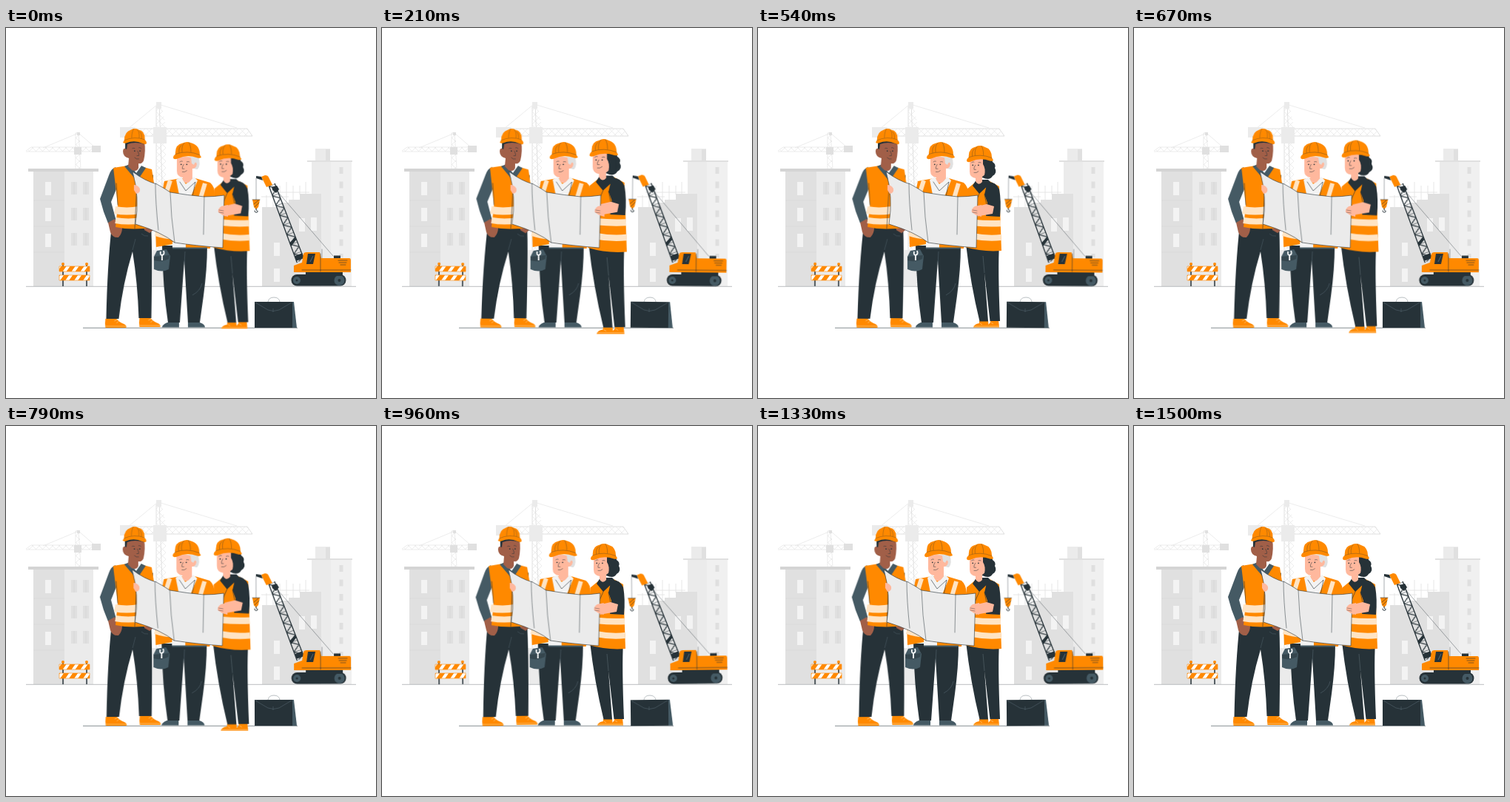
An HTML page without scripts that plays this animation: 500x500 px, repeating every 1.54 s.

```html
<!DOCTYPE html>
<html lang="en">
<head>
<meta charset="utf-8">
<title>Construction team</title>
<style>
html, body { margin: 0; width: 100%; height: 100%; overflow: hidden; background: #fff; }
svg { display: block; width: 100%; height: 100%; }

.orange { fill: #ff8900; }
.dark { fill: #263238; }
.slate { fill: #455a64; }
.brown { fill: #a15f48; }
.skin { fill: #ffb89d; }
.cream { fill: none; stroke: #ffe4c4; }
.ink { fill: none; stroke: #263238; stroke-linecap: round; stroke-linejoin: round; }
.shade { fill: #e0e0e0; }
.light { fill: #ebebeb; }
.pale { fill: #f3f3f3; }
.wire { fill: none; stroke: #e0e0e0; }

/* Each loop moves for 1.5s and then holds for 40ms. */
.sway, .beat, .shake { animation: 1.54s -.02s linear infinite; }
.sway, .beat { transform-box: fill-box; transform-origin: center; }
.sway { animation-name: sway; }
.beat { animation-name: beat; }
.shake { animation-name: shake; }

@keyframes sway {
  0%, 97.4%, 100% { transform: rotate(0deg); }
  24.4% { transform: rotate(1deg); }
  73.1% { transform: rotate(-1deg); }
}
@keyframes beat {
  0%, 29.2%, 39%, 58.4%, 100% { transform: scale(1); }
  9.7%, 48.7% { transform: scale(1.1); }
}
@keyframes shake {
  0%, 97.4%, 100% { transform: translateX(0); }
  9.7%, 87.7% { transform: translateX(-1px); }
  19.5%, 77.9% { transform: translateX(2px); }
  29.2%, 48.7%, 68.2% { transform: translateX(-4px); }
  39%, 58.4% { transform: translateX(4px); }
}
</style>
</head>
<body>
<svg viewBox="0 0 500 500" stroke-width=".6">
  <defs>
    <pattern id="truss" width="9" height="9" patternUnits="userSpaceOnUse">
      <path class="wire" d="M0 0L9 9M9 0L0 9"/>
    </pattern>
    <pattern id="lattice" width="10" height="14" x="-5" patternUnits="userSpaceOnUse">
      <path class="ink" stroke-width="1.2" d="M0 0L10 7L0 14M0 0H10"/>
    </pattern>
    <pattern id="hazard" width="12" height="8" patternUnits="userSpaceOnUse" patternTransform="skewX(-35)">
      <path fill="#fff" d="M0 0h12v8H0z"/>
      <path class="orange" d="M0 0h7v8H0z"/>
    </pattern>
    <g id="helmet">
      <path class="orange" d="M-16 16Q-17 3-6 1Q0-2 6 1Q17 4 17 17L19 20Q18 22 14 21Q0 16-13 22Q-18 24-19 21Q-19 18-16 16Z"/>
      <path class="ink" stroke-opacity=".55" d="M-16 16Q0 10 17 17M-7 13Q-8 4-4 1M5 13Q5 4 2 0M-11 14Q-12 7-8 4"/>
    </g>
    <g id="face">
      <path class="ink" d="M-7-6q2-2 4-1M4-6q3-1 4 0M-1-2Q-4 3-3 5H0M-3 10Q1 11 4 8"/>
      <circle class="dark" cx="-5" cy="-2" r="1"/>
      <circle class="dark" cx="4" cy="-2" r="1"/>
    </g>
    <g id="shoe">
      <path class="orange" d="M0 0H15Q19 5 25 7Q29 9 28 12H0Q-1 6 0 0Z"/>
      <path d="M0 10H28M12 3l4-2M15 6l3-3" fill="none" stroke="#ffd39b"/>
    </g>
    <path id="pane" class="pale" d="M0 0h8v18H0z"/>
    <g id="panes" class="shade">
      <path d="M0 0h8v17H0zM16 0h8v17h-8z"/>
      <path d="M4 0v17M20 0v17" stroke="#d6d6d6"/>
    </g>
  </defs>

  <!-- Tower cranes -->
  <g>
    <path class="wire" d="M98 142L50 162M98 142L120 161M94 190V142L98 141L101 190M27 166L34 161H127M27 167H127"/>
    <path fill="url(#truss)" d="M34 161H117V167H28zM94 145h6v45h-6z"/>
    <path class="shade" d="M116 159h12v9h-12zM92 161h10v10H92zM96 141h4v4h-4z"/>
    <path class="wire" d="M206 103L312 135M205 103L165 136"/>
    <path class="wire" stroke-width="1" d="M203 349V106L207 100L216 349M155 146H333L326 136H155"/>
    <path fill="url(#truss)" d="M165 136H326L333 146H165zM203 108h8l5 25V349H203z"/>
    <path class="light" d="M154 134h21v14h-21zM199 134h18v22h-18zM203 100h7v9h-7z"/>
    <path class="light" d="M195 300h19v49h-19z"/>
  </g>

  <!-- Buildings -->
  <g>
    <path class="shade" d="M37 194h42v155H37z"/>
    <path class="light" d="M79 194h39v155H79z"/>
    <path fill="#d4d4d4" d="M30 190h95v4H30z"/>
    <path d="M37 233H79M37 268H79M37 303H79" stroke="#d6d6d6"/>
    <use href="#pane" x="53" y="208"/><use href="#pane" x="53" y="243"/><use href="#pane" x="53" y="278"/>
    <use href="#panes" x="88" y="208"/><use href="#panes" x="88" y="243"/><use href="#panes" x="88" y="277"/>

    <path class="light" d="M413 181h26v168H413zM418 163h20v17h-20z"/>
    <path fill="#f0f0f0" d="M439 181h28v168H439z"/>
    <path class="shade" d="M407 179h61v2H407zM432 164h6v15h-6z"/>
    <path d="M453 188V310" stroke="#dfdfdf" stroke-width="5" stroke-dasharray="9 10.5"/>
    <path class="shade" d="M346 349V242H372V236H382V232H397V224H426V349Z"/>
    <path class="wire" stroke-width=".8" d="M352 242V226M361 242V213M370 240V213M379 235V208M388 232V213M397 225V213M405 224V208M345 228H382M356 222H410"/>
    <use href="#pane" x="362" y="290"/><use href="#pane" x="362" y="325"/>
    <use href="#pane" x="396" y="257"/><use href="#pane" x="412" y="256"/>
  </g>

  <path d="M27 349.3H473" stroke="#8b9194"/>
  <path d="M104 405.3H394" stroke="#697276" stroke-width=".8"/>

  <!-- Barrier -->
  <g class="sway">
    <path d="M77 320V349M109 320V349" stroke="#263238" stroke-width="1.5"/>
    <path fill="url(#hazard)" stroke="#ff8900" d="M72 322h41v7H72zM72 334h41v7H72z"/>
    <circle class="orange" cx="77" cy="319" r="2"/><circle class="orange" cx="109" cy="319" r="2"/>
  </g>

  <!-- Crawler crane -->
  <g class="sway">
    <path class="ink" stroke-width=".4" d="M365 219L442 308M338 203V232M427 299V312"/>
    <g transform="translate(359 212) rotate(-20.7)">
      <path fill="url(#lattice)" d="M-4.500 0H5V110H-5z"/>
      <path class="ink" stroke-width="1.3" d="M-4 0L-5 110M4.500 0L5.500 110"/>
      <path class="dark" d="M-5 82L5 77V81L-5 87zM-5 101H6V108H-5z"/>
    </g>
    <path class="orange" d="M345 201L350 199Q354 199 355 202L360 212L352 215Z"/>
    <path class="dark" d="M338 200L345 201L347 206L338 203ZM359 215L366 213L369 218L365 223L360 219Z"/>
    <path class="orange" d="M333 232H343L341 242L338 245L335 242Z"/>
    <path class="ink" d="M333 232H343M335 238L341 233M336 242L342 236"/>
    <path class="ink" stroke-width="1" d="M338 244V246Q342 248 339 249Q336 250 336 247"/>
    <rect class="dark" x="385.5" y="333" width="74" height="15.5" rx="7.7"/>
    <circle class="slate" cx="393" cy="341" r="5"/><circle class="slate" cx="450.5" cy="341" r="7"/>
    <circle class="dark" cx="393" cy="341" r="1.5"/><circle class="dark" cx="450.5" cy="341" r="2"/>
    <path class="dark" d="M405 329H455V335H405zM443 307.5h9v4h-9z"/>
    <path class="orange" d="M389 321L400 317L402 305Q403 303 406 303H424L426 311H464Q466 311 466 314V330H389Z"/>
    <path class="dark" d="M408 305H418L415 319H406Z"/>
    <path d="M411 316L415 308" stroke="#78909c"/>
    <path class="ink" d="M425 305V329M400 327H466M449 314H461M450 317H460M452 320H459"/>
  </g>

  <!-- Briefcase -->
  <g class="sway">
    <path d="M354 370Q355 364 362 364Q369 364 370 370" fill="none" stroke="#b7bdc0" stroke-width="1"/>
    <path class="slate" d="M386 370H389L393 405H386Z"/>
    <path class="dark" d="M336 370H387V405H336Z"/>
    <path d="M337 371L354 381Q361 384 369 381L386 371M361 379V384" fill="none" stroke="#52646d"/>
  </g>

  <!-- Left worker -->
  <g class="sway">
    <use href="#shoe" x="134.5" y="393"/><use href="#shoe" x="180.5" y="392"/>
    <path class="dark" d="M143 266H196Q198 300 196.500 392H179.500Q178 345 171 302Q158 345 152.500 393H135.500Q137 320 143 266Z"/>
    <path d="M171 300L175 285M183 278q4 4 9 3" stroke="#4b5b63" fill="none"/>
    <path class="slate" d="M148 188Q142 190 139 199L127 231Q131 248 138 264L148.500 259L142 235L151 213ZM190 190L199 199V215H188Z"/>
    <path class="brown" d="M138 263L147 258Q150 265 157 270Q157 278 152 283Q144 284 141 276ZM186 268L197 266L200 272L194 277L187 273Z"/>
    <path class="orange" d="M145 189L164 186L178 200L186 188L197 191L200 210V269Q172 274 148 269L151 239Z"/>
    <path class="slate" d="M160 187L167 184L176 196L183 186L189 189L177 207Z"/>
    <path class="cream" stroke-width="10" d="M147 246Q163 249 180 246"/>
    <path class="cream" stroke-width="8" d="M148 260Q164 263 185 260"/>
    <path class="ink" d="M177 208L174 271M151 239L149 210"/>
    <path class="brown" d="M162 154H187Q189 166 186 179Q184 184 179 183V189Q177 195 170 192L165 187L166 176Q158 174 158 167Q158 162 162 163Z"/>
    <path class="dark" d="M161 154Q175 149 188 155L187 157Q174 153 164 157L163 164L161 163Z"/>
    <use href="#face" transform="translate(177 168) scale(-.8 .9)"/>
    <use href="#helmet" transform="translate(174 136.5) scale(-.84 .9)"/>
  </g>

  <!-- Right worker -->
  <g class="beat">
    <path class="orange" d="M299 396H311L312 404.5H291Q292 400 299 399ZM314 395H325L326 404.5H311Q311 400 314 398Z"/>
    <path d="M291 403H326M300 399l3 2M315 398l3 2" stroke="#ffd39b"/>
    <path class="dark" d="M281 292H326Q324 325 327 396H313.500L306 331L311 396.500H299.500Q287 345 281 292Z"/>
    <path d="M304 308L306 331" stroke="#5a6970"/>
    <path class="orange" d="M282 218L293 209L313 207L326 214L329 301Q304 303 280 296Z"/>
    <path class="dark" d="M290 213L295 205H311L315 209L299 224ZM310 208Q321 207 326 218Q329 234 327 255L308 254L310 236L306 225Z"/>
    <path class="cream" stroke-width="8.5" d="M291 263Q310 265 328 264"/>
    <path class="cream" stroke-width="8" d="M289 281Q310 285 328.5 283"/>
    <path class="ink" d="M299 224L292 240M306 225L309 239"/>
    <path class="skin" d="M296 241L309 238L319 241L317 251L294 255Z"/>
    <path class="dark" d="M290 176H316L317 181Q322 184 320 189Q324 196 317 200Q313 207 303 202Z"/>
    <path class="skin" d="M286 177Q297 172 307 178V198L303 201V208Q298 214 294 207V203Q286 202 286 194Z"/>
    <path class="dark" d="M304 177H315V199H306Q308 190 304 184Z"/>
    <use href="#face" transform="translate(294.5 187) scale(.85)"/>
    <use href="#helmet" transform="translate(300 159.5) scale(.95)"/>
  </g>

  <!-- Middle worker and plan -->
  <g class="shake">
    <path class="slate" d="M218 398H234V404.5H211Q211 401 218 398ZM246 398H262Q269 400 269 404.5H246Z"/>
    <path class="dark" d="M211 294H272Q272 325 267 362L262 398H246L241 314L235 398H219Q212 350 211 294Z"/>
    <path d="M242 302L241 320M265 345Q263 355 252 361" stroke="#52646d" fill="none"/>
    <path class="orange" d="M214 207L236 203H256L276 209Q282 214 283 226L276 298H242L226 292L203 296L202 268Z"/>
    <path class="pale" d="M225 289L243 292V297H225Z"/>
    <path d="M225 297.5H272" stroke="#455a64" stroke-width="2"/>
    <path class="cream" stroke-width="8" d="M202 277Q214 281 228 282"/>
    <path class="cream" stroke-width="6" d="M222 206L217 222M269 210L263 230"/>
    <path class="pale" d="M230 205L237 201L243 211L254 201L259 206L249 230H235Z"/>
    <path class="ink" d="M235 208L243 220L256 208L252 228"/>
    <path class="shade" d="M231 174H260Q264 185 259 191Q254 191 250 187Z"/>
    <path class="skin" d="M231 176Q242 172 252 176L253 182Q257 179 258 184Q257 190 252 190V203Q244 215 239 205V202Q231 201 231 193Z"/>
    <path class="shade" d="M250 175H261L260 181Q256 180 254 185L251 183Z"/>
    <use href="#face" transform="translate(241 186) scale(.85)"/>
    <use href="#helmet" transform="translate(245 154.5)"/>

    <path class="slate" d="M204 301L217 299L222 308L220 326Q211 331 200 326V309Z"/>
    <path class="dark" d="M200 309L221 307L220 312Q211 317 200 314Z" opacity=".5"/>
    <path d="M211 314V307M209 302Q208 307 211 307Q215 306 213 301" fill="none" stroke="#fff" stroke-width="1.8"/>

    <path d="M171 194Q188 207 204 211Q213 216 222 222Q246 226 268 228Q282 228 295 226L293 297Q255 294 228 290Q211 276 175 265Q181 228 171 194Z" fill="#ebebeb" stroke="#263238"/>
    <path class="ink" stroke-width=".5" d="M202 210Q202 235 206 273M222 222Q223 255 228 290M268 228L267 279"/>
    <path class="skin" d="M173 212Q178 212 181 217Q182 223 176 224L173 219Z"/>
    <path class="skin" d="M300 239L291 241Q286 244 287 249L293 253L300 255Z"/>
    <path class="ink" stroke-width=".4" d="M288 246L294 247M288 249L294 250"/>
  </g>
</svg>
</body>
</html>
```
